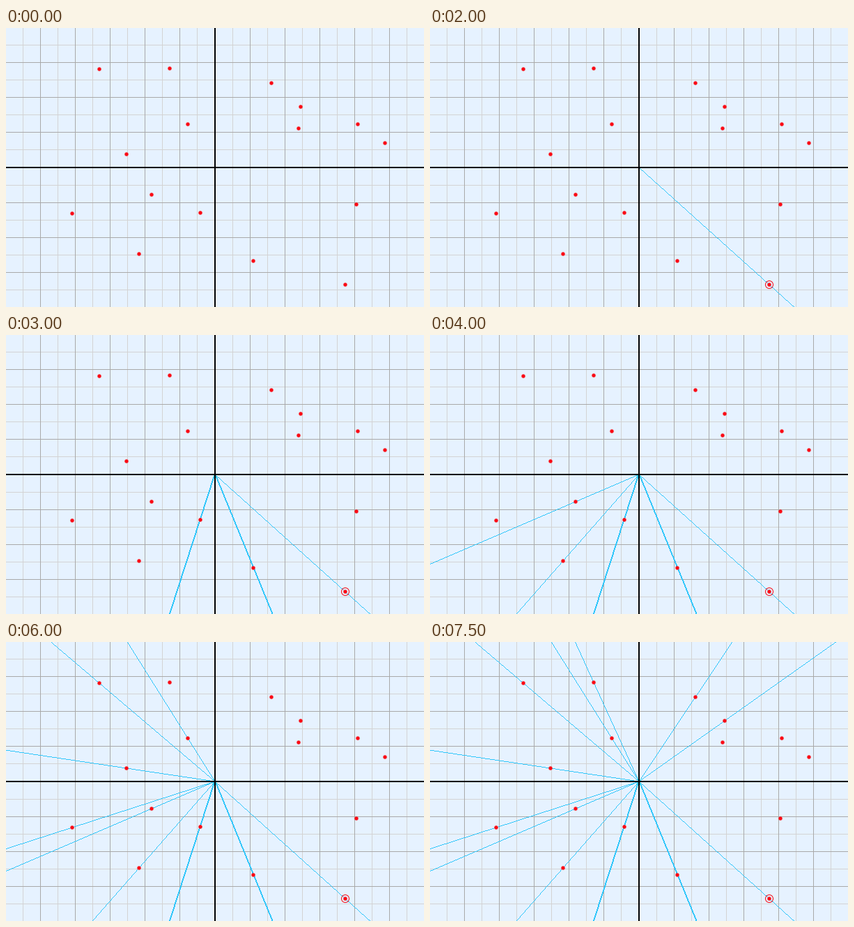
Animation of 600x400 px, one loop 8 s. Source, as a matplotlib script:

```python
import numpy as np
import matplotlib.pyplot as plt
from matplotlib.animation import FuncAnimation
from matplotlib.collections import LineCollection
from matplotlib.patches import Circle

W, H, DPI = 600, 400, 100
CX, CY = W // 2, H // 2
PX = 72 / DPI  # one pixel in points
STEP, FRAMES = 500, 16
PICK_AT, SWEEP_AT = 2, 4
STEEP = 2.3  # rays steeper than this come out two pixels wide

PAPER, MINOR, MAJOR = "#e6f2ff", "#d3d3d3", "#a9a9a9"
RED, RAY = "#fa0a14", "#2fc6fa"

PICK = (487, 368)
POINTS = [PICK, (134, 59), (235, 58), (261, 138), (173, 181),
          (381, 79), (423, 113), (420, 144), (505, 138), (544, 165),
          (95, 266), (209, 239), (279, 265), (191, 324),
          (355, 334), (503, 253)]

fig = plt.figure(figsize=(W / DPI, H / DPI), dpi=DPI, facecolor=PAPER)
ax = fig.add_axes([0, 0, 1, 1])
ax.set(xlim=(0, W), ylim=(H, 0))
ax.axis("off")


def add_lines(segments, color, z, width=1):
    lines = LineCollection(segments, colors=color, linewidths=width * PX,
                           capstyle="butt", zorder=z, snap=False)
    return ax.add_collection(lines, autolim=False)


def cross(d):
    """Full-length lines at distance d on all four sides of the centre."""
    return ([[(x, 0), (x, H)] for x in (CX - d, CX + d)]
            + [[(0, y), (W, y)] for y in (CY - d, CY + d)])


def grid(start, color, z):
    for d in range(start, CX, 50):
        add_lines(cross(d + 0.5), color, z)


def sweep_angle(p):
    angle = np.arctan2(p[1] - CY, p[0] - CX)
    start = np.arctan2(PICK[1] - CY, PICK[0] - CX)
    return (angle - start) % (2 * np.pi)


def ray(p):
    """Hard-edged ray from the centre, one pixel per step of its longer axis."""
    dx, dy = p[0] - CX, p[1] - CY
    t = np.arange(CX) + 0.5
    scale = t / max(abs(dx), abs(dy))
    x = np.floor(CX + dx * scale)
    y = np.floor(CY + dy * scale) + 0.5
    left, right = x, x + 1
    if abs(dy) > STEEP * abs(dx):
        left, right = (left, right + 1) if dx > 0 else (left - 1, right)
    pixels = np.stack([np.column_stack([left, y]),
                       np.column_stack([right, y])], axis=1)
    return add_lines(pixels, RAY, 3)


grid(25, MINOR, 1)
grid(50, MAJOR, 2)
add_lines([[(CX, 0), (CX, H)], [(0, CY), (W, CY)]], "black", 4, 2)

for p in POINTS:
    ax.add_patch(Circle(p, 3.1, fc=RED, ec="none", alpha=0.35, zorder=5))
    ax.add_patch(Circle(p, 2.5, fc=RED, ec="none", zorder=6))

ring = ax.add_patch(Circle(PICK, 5.5, fill=False, ec=RED, lw=PX, zorder=6))
rays = [ray(p) for p in sorted(POINTS, key=sweep_angle)]


def draw(frame):
    ring.set_visible(frame >= PICK_AT)
    for i, r in enumerate(rays):
        r.set_visible(frame >= SWEEP_AT + i)
    return [ring, *rays]


anim = FuncAnimation(fig, draw, frames=FRAMES, interval=STEP,
                     repeat=True, repeat_delay=0, blit=False)
plt.show()
```
